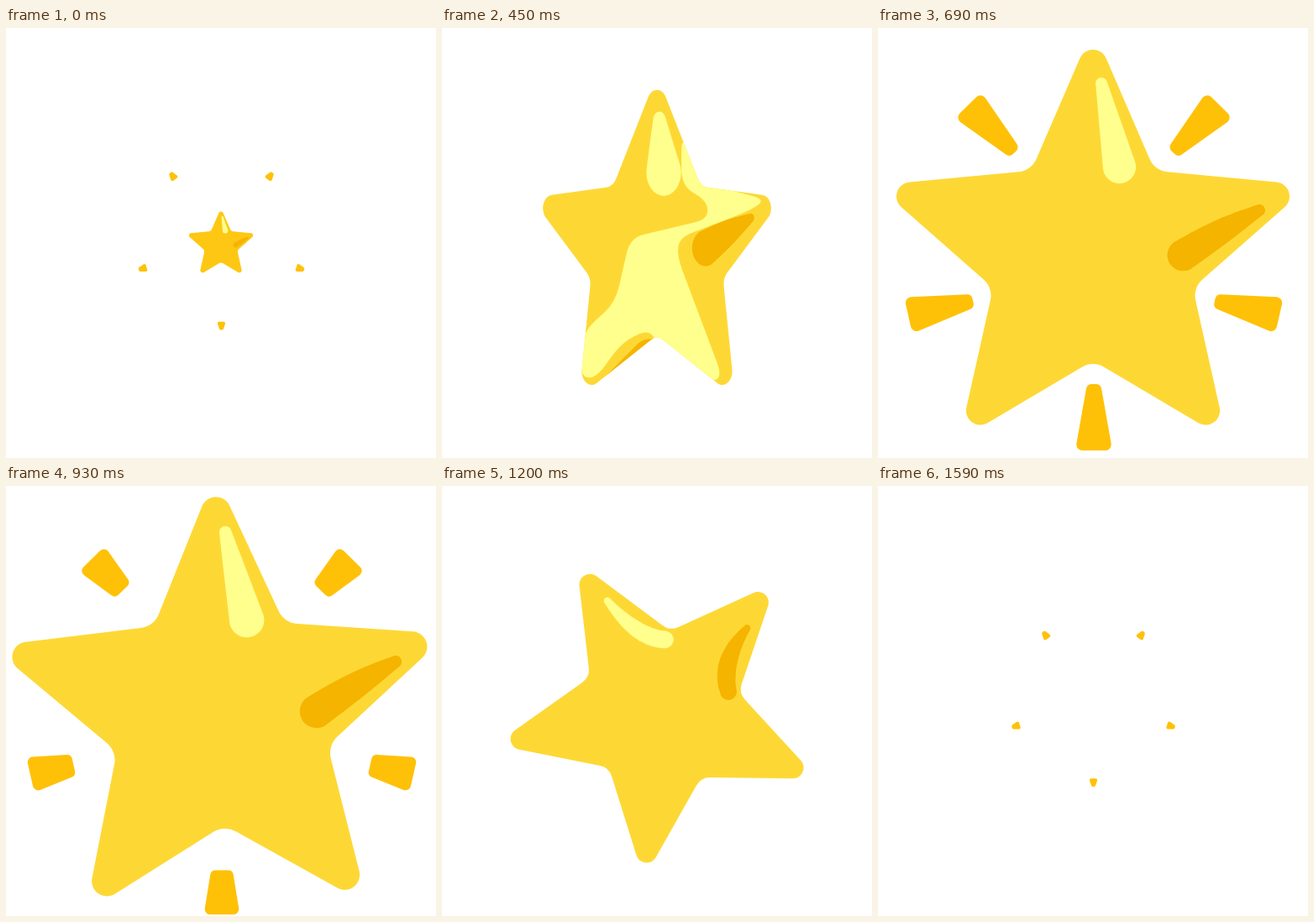
Recreate the animation shown at these times as an HTML page with a canvas. Size 512 by 512 pixels, loop 1620 ms.

```html
<!DOCTYPE html>
<html lang="en">
<head>
<meta charset="utf-8">
<title>Star</title>
<style>
  html, body { margin: 0; width: 100%; height: 100%; overflow: hidden; background: #fff; }
  canvas { display: block; width: 512px; height: 512px; }
</style>
</head>
<body>
<canvas id="stage" width="512" height="512"></canvas>
<script>
const ctx = document.getElementById('stage').getContext('2d');
const LOOP = 1620, C = 256, RAD = Math.PI / 180;
const YELLOW = '#fdd835', LIGHT = '#ffff8d', DARK = '#f5b400', AMBER = '#ffc107', FACE = '#fbbf12';

const mix = (a, b, k) => a + (b - a) * k;
const fade = (t, from, to) => {
  const k = Math.min(1, Math.max(0, (t - from) / (to - from)));
  return k * k * (3 - 2 * k);
};

// Smooth curve through [time, value] keys, held at both ends.
function track(...keys) {
  const n = keys.length - 1;
  const sec = i => (keys[i + 1][1] - keys[i][1]) / (keys[i + 1][0] - keys[i][0]);
  const slope = keys.map((_, i) => {
    if (i === 0) return sec(0);
    if (i === n) return sec(n - 1);
    const a = sec(i - 1), b = sec(i);
    return a * b <= 0 ? 0 : 2 * a * b / (a + b);
  });
  return t => {
    if (t <= keys[0][0]) return keys[0][1];
    if (t >= keys[n][0]) return keys[n][1];
    const i = keys.findIndex(k => k[0] > t) - 1;
    const [t0, v0] = keys[i], [t1, v1] = keys[i + 1];
    const h = t1 - t0, u = (t - t0) / h, w = 1 - u;
    return v0 * (1 + 2 * u) * w * w + v1 * u * u * (3 - 2 * u)
      + h * u * w * (slope[i] * w - slope[i + 1] * u);
  };
}

const size = track([0, .163], [270, .529], [450, .783], [540, .897], [690, 1],
  [900, 1.057], [1080, 1.025], [1110, .983], [1320, .364], [1440, 0]);
const spin = track([0, 0], [270, 230], [450, 318], [540, 337], [690, 360]);
const turn = track([870, 0], [1080, -6], [1110, -8.7], [1320, -69.5], [1440, -108]);
const rayFrom = track([570, -40], [690, 0], [840, 10], [1050, 80]);
const rayTo = track([570, -40], [690, 79], [840, 88], [1050, 82]);
const chipDist = track([1440, 40], [1590, 97], [1620, 98.5], [1890, 147]);

const polar = (r, deg) => [r * Math.cos(deg * RAD), r * Math.sin(deg * RAD)];
const fiveTimes = draw => { for (let i = 0; i < 5; i++) draw(18 + 72 * i); };

// Tips and notches alternate; a turned star bulges at its notches.
function starPath(bulge) {
  const pts = Array.from({ length: 10 }, (_, i) => {
    const [x, y] = polar(i % 2 ? 125 : 271, i * 36 - 90);
    return [x + (i % 2 ? bulge * Math.sign(Math.round(x)) : 0), y + 15];
  });
  const tip = 17 * (1 + bulge * .012);
  ctx.beginPath();
  ctx.moveTo((pts[9][0] + pts[0][0]) / 2, (pts[9][1] + pts[0][1]) / 2);
  pts.forEach((p, i) => ctx.arcTo(...p, ...pts[(i + 1) % 10], i % 2 ? 25 : tip));
  ctx.closePath();
}

// Polygon whose corners are softened over a distance d.
function fillPoly(color, pts, d = 0) {
  const toward = (p, q) => {
    const k = Math.min(.5, d / Math.hypot(q[0] - p[0], q[1] - p[1]));
    return [mix(p[0], q[0], k), mix(p[1], q[1], k)];
  };
  ctx.beginPath();
  pts.forEach((p, i) => {
    ctx.lineTo(...toward(p, pts.at(i - 1)));
    ctx.quadraticCurveTo(...p, ...toward(p, pts[(i + 1) % pts.length]));
  });
  ctx.fillStyle = color;
  ctx.fill();
}

// Drop along a bent line; its radius runs from r0 to r1, plus a swell in the middle.
function fillDrop(color, { a, bend, b, r0, r1, swell }) {
  ctx.beginPath();
  for (let u = 0; u <= 1; u += 1 / 40) {
    const [x, y] = [0, 1].map(j => mix(mix(a[j], bend[j], u), mix(bend[j], b[j], u), u));
    const r = mix(r0, r1, u) + swell * Math.sin(Math.PI * u);
    ctx.moveTo(x + r, y);
    ctx.arc(x, y, r, 0, 2 * Math.PI);
  }
  ctx.fillStyle = color;
  ctx.fill();
}

const drop = (a, bend, b, r0, r1, swell = 0) => ({ a, bend, b, r0, r1, swell });
const mixDrop = (p, q, k) => Object.fromEntries(Object.keys(p).map(key => [key,
  Array.isArray(p[key]) ? p[key].map((v, i) => mix(v, q[key][i], k)) : mix(p[key], q[key], k)]));

// Highlight and shadow at rest, and curled around the notches.
const SHINE = drop([10, -190], [21, -139], [32, -88], 7, 20);
const SHINE_CURL = drop([13, -157], [26, -40], [107, -60], 4, 4, 8);
const SHADE = drop([198, -39], [151, -14], [105, 16], 7, 19, 2);
const SHADE_CURL = drop([156, -13], [64, 11], [105, 93], 4, 4, 9);

const GLEAM_TOP = drop([5, -187], [9, -146], [14, -105], 13, 36);
const GLEAM_DARK = drop([192, -38], [145, -16], [97, 9], 7, 28, 2);
const GLEAM = [[222, -66], [192, -50], [46, -8], [41, 20], [134, 204], [107, 212], [-2, 148],
  [-19, 132], [-70, 150], [-127, 207], [-158, 202], [-151, 135], [-85, 90], [-55, -8],
  [104, -36], [103, -64], [50, -87], [50, -165], [92, -92]];

function drawGleam() {
  fillPoly(LIGHT, GLEAM, 26);
  fillDrop(LIGHT, GLEAM_TOP);
  fillDrop(DARK, GLEAM_DARK);
  fillPoly(DARK, [[2, 146], [-30, 146], [-123, 216], [-90, 214]], 14);
}

function drawBack(bulge) {
  ctx.save();
  ctx.translate(38, 4);
  starPath(bulge);
  ctx.fillStyle = FACE;
  ctx.fill();
  ctx.restore();
  fillPoly(YELLOW, [[24, -215], [110, -83], [58, -75]]);
  fillPoly(DARK, [[240, -44], [120, 34], [141, 60]]);
  fillPoly(DARK, [[0, 156], [41, 132], [94, 210]]);
}

function withAlpha(alpha, draw) {
  if (alpha <= 0) return;
  ctx.globalAlpha = alpha;
  draw();
}

function drawStar(t) {
  const s = size(t);
  if (s < .005) return;
  const a = spin(t) * RAD, curl = fade(t, 1110, 1320);
  const c = Math.max(.25, Math.abs(Math.cos(a)));
  const bulge = Math.min(60, 18 * Math.abs(Math.sin(a)) / c);
  ctx.save();
  ctx.translate(C, C);
  ctx.rotate(turn(t) * RAD);
  ctx.scale(s * c, s);
  starPath(bulge);
  ctx.fillStyle = YELLOW;
  ctx.fill();
  ctx.clip();
  withAlpha(.7 * (1 - fade(t, 0, 200)), () => {
    ctx.fillStyle = AMBER;
    ctx.fill();
  });
  withAlpha(1 - fade(t, 90, 140) + fade(t, 500, 600), () => {
    fillDrop(LIGHT, mixDrop(SHINE, SHINE_CURL, curl));
    fillDrop(DARK, mixDrop(SHADE, SHADE_CURL, curl));
  });
  withAlpha(fade(t, 330, 390) - fade(t, 500, 600), drawGleam);
  withAlpha(fade(t, 90, 130) - fade(t, 330, 390), () => drawBack(bulge));
  ctx.restore();
}

// Wedge along x with rounded corners, from half width a to half width b.
function wedge(x0, x1, a, b, round) {
  ctx.beginPath();
  for (const p of [[x0, -a], [x1, -b], [x1, b], [x0, a]]) ctx.lineTo(...p);
  ctx.closePath();
  ctx.fillStyle = ctx.strokeStyle = AMBER;
  ctx.lineJoin = 'round';
  ctx.lineWidth = round;
  ctx.fill();
  ctx.stroke();
}

function drawRays(t) {
  if (t <= 570 || t >= 1050) return;
  const w = fade(t, 570, 690) * mix(1, .2, fade(t, 900, 1050)), pad = 7 * w;
  const x0 = rayFrom(t) + pad, x1 = Math.max(x0, rayTo(t) - pad);
  const half = x => Math.max(0, (8 + 14 * x / 79) * w - pad);
  fiveTimes(deg => {
    const [x, y] = polar(154, deg + 3 * Math.cos(deg * RAD));
    ctx.save();
    ctx.translate(C + 1 + x, C + 14 + y);
    ctx.rotate((deg - 9 * Math.sin(2 * deg * RAD)) * RAD);
    wedge(x0, x1, half(x0), half(x1), pad * 2);
    ctx.restore();
  });
}

function drawChips(t) {
  const u = t < 400 ? t + LOOP : t;
  const s = fade(u, 1440, 1530) * Math.min(1, (1950 - u) / 150 + .05);
  if (s <= 0 || u > 1950) return;
  fiveTimes(deg => {
    ctx.save();
    ctx.translate(C + .5, C);
    ctx.rotate(deg * RAD);
    ctx.translate(chipDist(u), 0);
    ctx.scale(s, s);
    wedge(-2.8, 3, 2.6, .7, 4);
    ctx.restore();
  });
}

function frame(time) {
  const t = time % LOOP;
  ctx.fillStyle = '#fff';
  ctx.fillRect(0, 0, 512, 512);
  drawChips(t);
  drawRays(t);
  drawStar(t);
}

let start;
function tick(now) {
  start ??= now;
  frame(now - start);
  requestAnimationFrame(tick);
}
frame(0);
requestAnimationFrame(tick);
</script>
</body>
</html>
```
